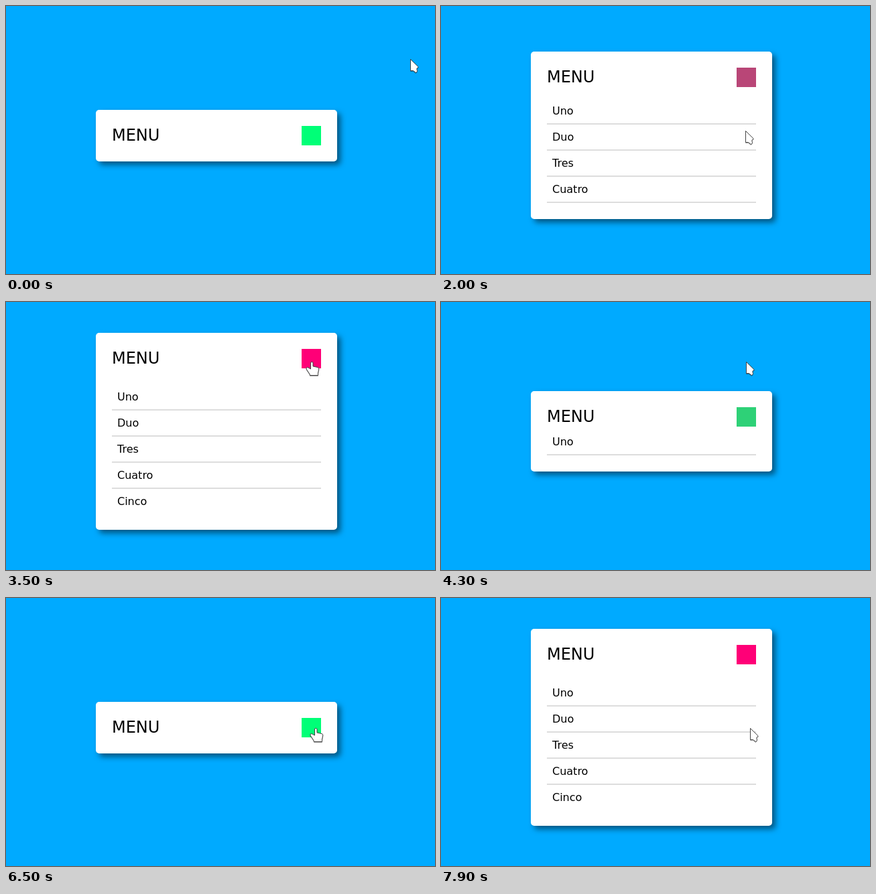
An HTML page for the animation above (8 s loop, 640x400 px).

```html
<!DOCTYPE html>
<html lang="es">
<head>
<meta charset="utf-8">
<title>Menu</title>
<style>
  html, body { margin: 0; width: 100%; height: 100%; overflow: hidden; background: #0af; }
  body { position: relative; font: 16px/19px "DejaVu Sans", sans-serif; color: #000; }
  #card {
    position: absolute; left: 134px; width: 312px; padding: 24px;
    background: #fff; border-radius: 5px; box-shadow: 5px 5px 8px rgba(0, 0, 0, .5);
  }
  header { display: flex; justify-content: space-between; font-size: 24px; line-height: 29px; }
  #button { width: 29px; height: 29px; }
  ul { margin: 0; padding: 0; list-style: none; overflow: hidden; }
  li { padding: 9px 8px; border-bottom: 2px solid #ddd; }
  li:last-child { border: 0; }
  #cursor {
    position: absolute; left: 0; top: 0; width: 24px; height: 24px; overflow: visible;
    filter: drop-shadow(.5px 1px .7px rgba(0, 0, 0, .35));
  }
</style>
</head>
<body>
<div id="card">
  <header><span>MENU</span><div id="button"></div></header>
  <ul id="list"><li>Uno</li><li>Duo</li><li>Tres</li><li>Cuatro</li><li>Cinco</li></ul>
</div>
<svg id="cursor"><path id="shape" fill="#fff" stroke="#444" stroke-linejoin="round"/></svg>
<script>
const LOOP = 8000, STEP = 100, FADE = 500;
const ARROW = 'M.5 .5V17.5H4.5L8.5 20.5 10.5 18.5 9.8 14.5 12.3 12Z';
const HAND = 'M-.5 11V2Q-.5 .5 1.25 .5T3 2V7L10 8.5Q12 9 11.8 11L10.5 17V20.5H-1.5L-2 18.5-7 11Q-7.5 8.5-5 8.5Z';

// [start, end, x, y] of each pointer move
const START = [603, 79];
const MOVES = [
  [200, 900, 454, 184], [1100, 1300, 454, 186],
  [2900, 3300, 455, 94], [3400, 3500, 455, 89],
  [5300, 5900, 461, 212], [6000, 6200, 461, 208], [6300, 6500, 461, 194]
];
// [time, open]
const CLICKS = [[1731, 1], [3982, 0], [7398, 1]];

const $ = id => document.getElementById(id);
const card = $('card'), button = $('button'), list = $('list'), cursor = $('cursor'), shape = $('shape');
const clamp = v => Math.min(1, Math.max(0, v));
const glide = p => (p + p * p * (3 - 2 * p)) / 2;

// cubic-bezier(0, 0, .58, 1)
function easeOut(p) {
  let lo = 0, hi = 1;
  for (let i = 0; i < 24; i++) {
    const s = (lo + hi) / 2;
    if (1.74 * s * s - .74 * s ** 3 < p) lo = s; else hi = s;
  }
  return lo * lo * (3 - 2 * lo);
}

function pointerAt(t) {
  let [x, y] = START;
  for (const [from, to, tx, ty] of MOVES) {
    const p = glide(clamp((t - from) / (to - from)));
    x += (tx - x) * p;
    y += (ty - y) * p;
  }
  return [Math.round(x), Math.round(y)];
}

function openAt(t) {
  let k = 0;
  for (const [time, open] of CLICKS) {
    const p = clamp((t - time) / FADE);
    if (p > 0) k += (open - k) * (p < 1 ? easeOut(p) : 1);
  }
  return k;
}

function draw(t) {
  const k = openAt(t), gap = 24 * k, height = Math.min(193, 216 * k);
  const top = 193 - (77 + gap + height) / 2;
  card.style.top = top + 'px';
  list.style.marginTop = gap + 'px';
  list.style.height = height + 'px';
  button.style.background = `rgb(${Math.round(255 * k)}, ${Math.round(255 * (1 - k))}, 119)`;

  const [x, y] = pointerAt(t), dy = y - Math.round(top + 24);
  const over = x >= 441 && x < 470 && dy >= 0 && dy < 29;
  shape.setAttribute('d', over ? HAND : ARROW);
  cursor.style.transform = `translate(${x}px, ${y}px)`;
}

const begin = performance.now();
function tick() {
  const t = (performance.now() - begin) % LOOP;
  draw(Math.floor(t / STEP) * STEP);
  requestAnimationFrame(tick);
}
tick();
</script>
</body>
</html>
```
